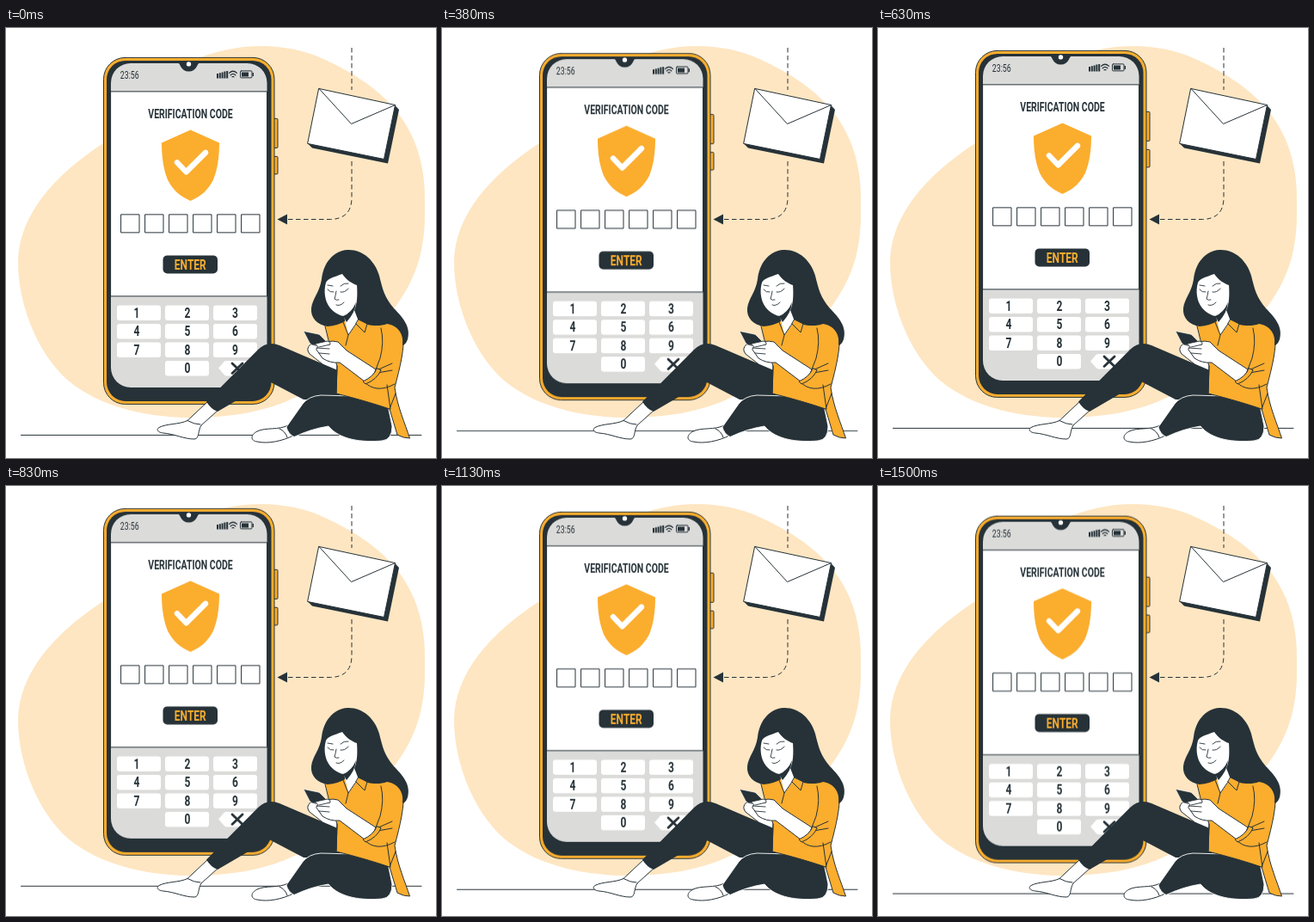
Animation, 500 px wide and 500 px high, one loop 1.54 s. Source, as an HTML page without scripts:

```html
<!DOCTYPE html>
<html lang="en">
<head>
<meta charset="utf-8">
<title>Verification code</title>
<style>
  :root { --ink: #263238; --orange: #fbad2e; --gray: #dbdbda; }
  html, body { margin: 0; width: 100%; height: 100%; overflow: hidden; background: #fff; }
  svg { display: block; width: 100%; height: 100%; }
  .ink { fill: var(--ink); }
  .orange { fill: var(--orange); }
  .gray { fill: var(--gray); }
  .white { fill: #fff; }
  .line { stroke: var(--ink); stroke-linecap: round; stroke-linejoin: round; }
  .open { fill: none; }
  .dash { stroke-dasharray: 5.5 3.5; stroke-linecap: butt; }
  .keys rect { width: 51px; height: 17.5px; rx: 3px; }
  text {
    font: 700 16.5px Roboto, "Liberation Sans", sans-serif;
    text-anchor: middle;
    transform-box: fill-box;
    transform-origin: center;
    transform: scaleX(.73);
  }
  .keys text { font-weight: 600; }
  .title { font-size: 14.4px; }
  .clock { font-size: 12px; font-weight: 400; }
  .float { animation: float 1540ms linear infinite; }
  @keyframes float {
    0% { transform: translateY(-.6px); }
    47.7% { transform: translateY(-10px); }
    97.5% { transform: translateY(0); }
    100% { transform: translateY(-.6px); }
  }
</style>
</head>
<body>
<svg viewBox="0 0 500 500">
  <path fill="#fee6c2" d="M113 134C150 108 165 62 215 39C266 15 326 16 369 36C444 70 491 118 487 210C488 262 475 295 450 328C410 388 350 440 264 450C205 458 130 452 80 416C40 387 14 325 14 272C15 218 55 172 113 134Z"/>

  <!-- Message and its route -->
  <path class="line open dash" d="M402 23V72M402 155V197Q402 222.500 376 222.500H327"/>
  <path class="ink" d="M315.500 222.500L327 216.500V228.500Z"/>
  <path class="ink" d="M452 89.500L457 95L444 157.500L356 139.500L351 134.500Z"/>
  <path class="white line" d="M364 70.500L452.500 89.500L439.500 152.500L351 134.500Z"/>
  <path class="line open" d="M364 70.500L401.500 111.500L452.500 89.500"/>

  <g class="float">
    <path class="line" d="M17.500 474H483"/>

    <!-- Phone body -->
    <rect class="orange line" x="310" y="106" width="6" height="34" rx="1"/>
    <rect class="orange line" x="310" y="150" width="6" height="20.500" rx="1"/>
    <rect class="orange line" x="113.500" y="35" width="198.500" height="403" rx="25"/>
    <rect class="ink" x="117" y="38.500" width="191.500" height="396" rx="22"/>
    <rect class="gray" x="122" y="41.500" width="181.500" height="377" rx="23"/>
    <path class="white line" d="M122 74.500H303.500V312.500H122Z"/>
    <path class="ink" d="M199 40Q202 42 203 45Q206 51 212.500 51Q219 51 222 45Q223 42 226 40Z"/>
    <circle class="white" cx="212.500" cy="42.500" r="2.700"/>

    <!-- Status bar -->
    <text class="ink clock" x="143.700" y="59.400">23:56</text>
    <path class="open" stroke="#263238" stroke-width="2" d="M246 59v-5.500m2.800 5.500v-6.200m2.800 6.200v-7m2.800 7v-7.800m2.800 7.800v-8.500"/>
    <path class="line open" stroke-width="1.300" d="M259.500 53Q264 48.800 268.500 53M261.200 55.300Q264 52.700 266.800 55.300M263 57.500Q264 56.600 265 57.500"/>
    <rect class="open line" x="272.500" y="50.500" width="13.500" height="8" rx="1"/>
    <path class="ink" d="M274 52h8v5h-8zM286.500 52.500h1.500v4h-1.500z"/>

    <!-- Form -->
    <text class="ink title" x="214.500" y="106">VERIFICATION CODE</text>
    <path class="orange" d="M214.500 119L248 134C248 150 246 165 241 177C235 189 227 196 214.500 201.500C202 196 194 189 188 177C183 165 181 150 181 134Z"/>
    <path class="open" stroke="#fff" stroke-width="6.400" stroke-linecap="round" stroke-linejoin="round" d="M199 157L209.500 168L232 145.500"/>
    <path class="white line" d="M134 217.500h21v21h-21zm28 0h21v21h-21zm28 0h21v21h-21zm28 0h21v21h-21zm28 0h21v21h-21zm28 0h21v21h-21z"/>
    <rect class="ink" x="182.500" y="265" width="63.500" height="21" rx="5"/>
    <text class="orange" x="214.300" y="281.500">ENTER</text>

    <!-- Keypad -->
    <g class="keys">
      <g class="white">
        <rect x="129" y="323"/><rect x="185" y="323"/><rect x="241" y="323"/>
        <rect x="129" y="344.500"/><rect x="185" y="344.500"/><rect x="241" y="344.500"/>
        <rect x="129" y="366"/><rect x="185" y="366"/><rect x="241" y="366"/>
        <rect x="185" y="387.500"/>
        <path d="M247 396.200L254 388Q255 387.500 257 387.500H289Q292 387.500 292 390.500V402Q292 405 289 405H257Q255 405 254 404Z"/>
      </g>
      <g class="ink">
        <text x="152" y="337.500">1</text><text x="211" y="337.500">2</text><text x="266.500" y="337.500">3</text>
        <text x="152" y="359">4</text><text x="211" y="359">5</text><text x="266.500" y="359">6</text>
        <text x="152" y="380.500">7</text><text x="211" y="380.500">8</text><text x="266.500" y="380.500">9</text>
        <text x="211" y="402">0</text>
      </g>
      <path class="line" stroke-width="2.800" d="M263 390.500l12 11.500m0-11.500l-12 11.500"/>
    </g>
  </g>

  <!-- Woman: far arm, shirt -->
  <path class="white line" d="M354 368Q348 373 353 379L367 390L376 402H390L386 386L378 374Z"/>
  <path class="white line" d="M235 434L211 456.500C202 461 186 460 178 464.500C174 467 177 470.500 183 471C196 472 207 478 219 478C225 478 223 468 227 462L247 444Z"/>
  <path class="line open" d="M211 456.500Q219 461 226 461"/>

  <!-- Legs -->
  <path class="ink" d="M233 434.500L293 374Q304 363 318 369L388 399L392 432L346 432L306 411L246 446Q238 443 233 434.500Z"/>
  <path class="white line" d="M328 462C317 468 302 464 292 469C284 473 284 480 292 481C305 484 322 480 334 474Z"/>
  <path class="line open" d="M318 466Q325 469 327 476"/>
  <path class="ink" stroke="#fff" stroke-width=".9" d="M326 464L345 437Q352 428 366 427L442 429L449 463Q449 479 437 480C414 482 388 479 375 463Q355 466 335 475.500Q328 472 326 464Z"/>

  <path class="orange line" d="M371 345L394 337L441 335Q458 338 462 352C464 372 458 395 452 418C455 440 464 460 469.500 477Q462 477 455 473L446 443Q420 434 384 425L385 393L375 363Z"/>

  <!-- Hair and face -->
  <path class="ink" d="M397 258C414 257 429 270 434 288C438 304 440 313 451 326C462 337 471 348 467 362Q465 368 461 369C463 355 455 346 443 344C433 348 418 346 408 340L394 341Q386 346 374 347C362 345 354 337 355 326C356 315 365 307 367 292C369 274 380 259 397 258Z"/>
  <path class="white" d="M372 296C374 291 383 289 391 286C396 293 402 297 408 299C409 312 408 322 405 328L410 341L398 357L393 335C385 334 377 328 373 319C370 311 370 303 372 296Z"/>
  <path class="ink" d="M392 335Q402 331 407 319Q406 331 396 342Z"/>
  <path class="line open" stroke-width=".9" d="M374 304Q377 308 381 307M389 307Q394 308 398 303M374 299L380 300M389 300Q393 296 398 297M384 306Q383 312 382 315Q384 317 387 316M384 322Q388 324 393 319"/>

  <!-- Collar, seams and folds -->
  <path class="orange line" d="M410 339L420 344L417 354L407 344Z"/>
  <path class="line open" d="M392 342L398 357L407 344M398 357L395 369M436 349Q440 365 435 384L430 397M449 390L431 398M449 398L432 401M385 393L384 425M443 415L447 443M416 411Q430 426 452 414M453 425L446 443"/>

  <!-- Near arm and handset -->
  <path class="white line" d="M364 369Q374 362 386 365L396 375L430 397Q427 407 417 411L388 389Q377 390 368 384L361 374Z"/>
  <path class="ink" stroke="#fff" stroke-width=".6" d="M346 352.500L363 356Q365 356.500 366 358L377 369L357 369Q354 368 353 366Z"/>
  <path class="white line" stroke-width=".9" d="M360 367L374 364Q378 365 377 368L364 371M361 372L376 373M364 378L376 379"/>
  <path class="orange line" d="M431 396Q428 405 415 411L418 414Q431 409 436 398Z"/>
</svg>
</body>
</html>
```
